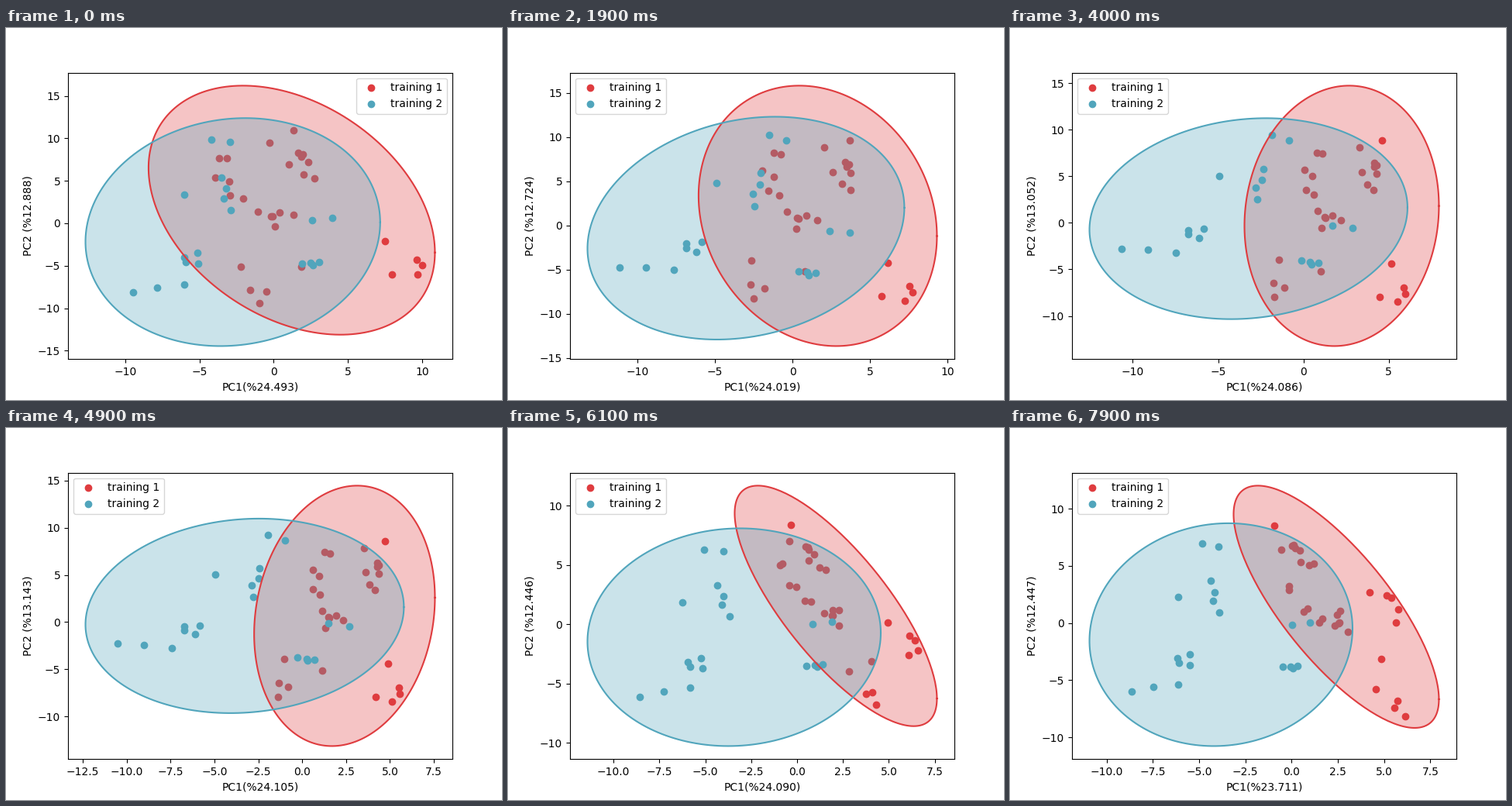
Recreate the animation shown at these times as a matplotlib script. Size 640 by 480 pixels, loop 8000 ms.

```python
import numpy as np
import matplotlib.pyplot as plt
from matplotlib.animation import FuncAnimation

FRAMES, INTERVAL = 80, 100
LEGEND_SWITCH = 7
RADIUS = np.sqrt(5.991)  # 95 % limit, two degrees of freedom

KEY_STEPS = [0, 19, 49, 61, 79]
PC1 = [24.493, 24.019, 24.105, 24.090, 23.711]
PC2 = [12.888, 12.724, 13.143, 12.446, 12.447]


def ease(i, keys):
    """Smoothstep between the key values around step i."""
    k = min(np.searchsorted(KEY_STEPS, i, side="right") - 1, len(keys) - 2)
    w = (i - KEY_STEPS[k]) / (KEY_STEPS[k + 1] - KEY_STEPS[k])
    w = w * w * (3 - 2 * w)
    return np.array(keys[k]) * (1 - w) + np.array(keys[k + 1]) * w


class Group:
    """A fixed cloud that is turned and sheared to fill a moving ellipse."""

    def __init__(self, label, color, clusters, keys, rng):
        self.label, self.color, self.keys = label, color, keys
        cloud = np.vstack([
            rng.uniform((x - dx, y - dy), (x + dx, y + dy), (n, 2))
            for n, x, y, dx, dy in clusters])
        cloud -= cloud.mean(axis=0)
        # Unit covariance, so the confidence ellipse becomes a circle.
        root = np.linalg.cholesky(np.cov(cloud.T))
        self.cloud = cloud @ np.linalg.inv(root).T / RADIUS

    def draw(self, ax, i):
        cx, cy, hx, hy, rho, turn = ease(i, self.keys)
        shear = np.array([[hx, 0], [hy * rho, hy * np.sqrt(1 - rho ** 2)]])
        c, s = np.cos(np.radians(turn)), np.sin(np.radians(turn))
        points = (cx, cy) + self.cloud @ (shear @ [[c, -s], [s, c]]).T

        a = np.linspace(0, 2 * np.pi, 200)
        x, y = ((cx, cy) + np.column_stack([np.cos(a), np.sin(a)]) @ shear.T).T
        ax.fill(x, y, facecolor=self.color, alpha=0.3, linewidth=0)
        ax.plot(x, y, color=self.color)
        ax.scatter(*points.T, color=self.color, label=self.label)


rng = np.random.default_rng(4)

# clusters: count, centre x, y, reach x, y
# keys: centre x, y, half width, half height, correlation, turn in degrees
groups = [
    Group("training 1", "#df3c3f",
          [(9, 2.8, 6.8, 1.7, 3.2),
           (6, -1.0, 5.3, 1.2, 2.8),
           (6, 0.7, 0.4, 1.6, 1.3),
           (4, -2.2, -6.4, 0.7, 2.6),
           (1, 1.2, -5.0, 0, 0),
           (5, 7.1, -6.5, 1.8, 3.0)],
          [(1.22, 1.54, 9.65, 14.66, -0.34, 22),
           (1.62, 1.10, 7.68, 14.74, -0.155, 0),
           (2.41, 0.66, 5.15, 13.79, 0.14, -18),
           (2.11, 1.54, 5.51, 10.14, -0.77, 63),
           (2.41, 1.42, 5.55, 10.60, -0.763, 85)], rng),
    Group("training 2", "#51a5bc",
          [(2, -1.4, 9.8, 0.9, 0.6),
           (4, -2.5, 4.0, 0.3, 2.2),
           (1, -5.0, 4.4, 0, 0),
           (2, 3.2, -0.2, 1.4, 0.5),
           (4, 1.0, -5.0, 1.1, 1.0),
           (4, -6.2, -2.2, 0.8, 1.6),
           (3, -9.4, -5.6, 2.0, 0.3)],
          [(-2.75, -1.04, 9.93, 13.42, 0.085, 20),
           (-3.01, -0.29, 10.21, 12.61, 0.183, 0),
           (-3.28, 0.66, 9.07, 10.30, 0.09, 0),
           (-3.43, -1.10, 7.99, 9.18, 0.04, 24),
           (-3.82, -1.02, 7.11, 9.75, 0.055, 20)], rng),
]


def update(i):
    ax.clear()
    for group in groups:
        group.draw(ax, i)
    ax.set_xlabel(f"PC1(%{ease(i, PC1):.3f})")
    ax.set_ylabel(f"PC2 (%{ease(i, PC2):.3f})")
    ax.legend(loc="upper right" if i < LEGEND_SWITCH else "upper left")
    return []


fig, ax = plt.subplots(figsize=(6.4, 4.8), dpi=100)
anim = FuncAnimation(fig, update, frames=FRAMES, interval=INTERVAL,
                     repeat=True, repeat_delay=0)
plt.show()
```
